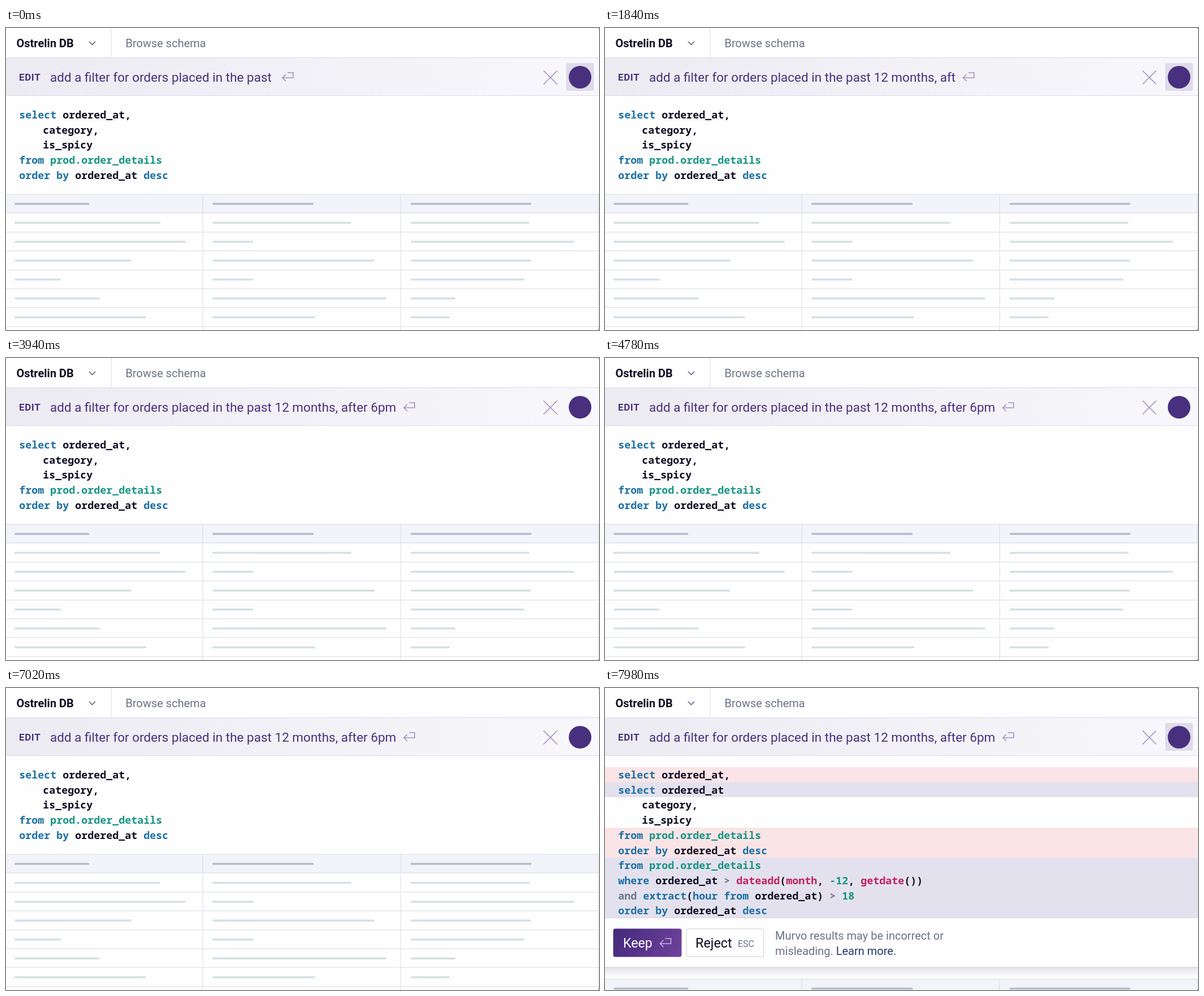
Write an HTML page with a canvas that moves like this. It is 1049 by 534 pixels and loops after 8 s.

```html
<!DOCTYPE html>
<html lang="en">
<head>
<meta charset="utf-8">
<title>Query edit</title>
<style>
html, body { margin: 0; width: 100%; height: 100%; overflow: hidden; background: #fff; }
canvas { display: block; width: 1049px; height: 534px; }
</style>
</head>
<body>
<canvas id="stage" width="1049" height="534"></canvas>
<script>
const W = 1049, H = 534, LOOP = 8000;
const ctx = document.getElementById('stage').getContext('2d');

const SANS = 'Roboto, "Open Sans", sans-serif';
const MONO = '"Noto Sans Mono", "DejaVu Sans Mono", monospace';
const INK = '#0d0b22', BLUE = '#1b6fa3', TEAL = '#149482', PINK = '#c31f5f', GRAY = '#6b7388';
const PURPLE = '#48307f', LILAC = '#a490c6', LINE = '#dcdaee';
const RED_BAND = '#fae4e6', NEW_BAND = '#e4e1ee';

const TYPE_STEP = 130, LOAD_START = 2800, LOAD_END = 7150;
const SHIFT_MS = 290, PANEL_START = 7540, PANEL_MS = 250;
const PROMPT = 'add a filter for orders placed in the past ';
const TYPED = '12 months, after 6pm';

// Code lines: [indent, band colour, ...[colour, text]]
const selectLine = (band, end) => [0, band, [BLUE, 'select '], [INK, 'ordered_at' + end]];
const fromLine = band => [0, band, [BLUE, 'from '], [TEAL, 'prod.order_details']];
const orderLine = band => [0, band, [BLUE, 'order by '], [INK, 'ordered_at '], [BLUE, 'desc']];
const columns = [[42, null, [INK, 'category,']], [42, null, [INK, 'is_spicy']]];

const BEFORE = [selectLine(null, ','), ...columns, fromLine(null), orderLine(null)];
const AFTER = [
  selectLine(RED_BAND, ','), selectLine(NEW_BAND, ''), ...columns,
  fromLine(RED_BAND), orderLine(RED_BAND), fromLine(NEW_BAND),
  [0, NEW_BAND, [BLUE, 'where '], [INK, 'ordered_at '], [GRAY, '> '], [PINK, 'dateadd'], [INK, '('],
    [PINK, 'month'], [INK, ', '], [TEAL, '-12'], [INK, ', '], [PINK, 'getdate'], [INK, '())']],
  [0, NEW_BAND, [GRAY, 'and '], [BLUE, 'extract'], [INK, '('], [BLUE, 'hour from '],
    [INK, 'ordered_at) '], [GRAY, '> '], [TEAL, '18']],
  orderLine(NEW_BAND)
];

// Right ends of the placeholder bars, per column
const COLS = [
  { x: 15, head: 147.5, ends: [273, 318, 222, 97, 166, 248] },
  { x: 365, head: 544.5, ends: [611, 438, 652, 438, 673, 547] },
  { x: 715.5, head: 929.5, ends: [926, 1005, 929, 917, 795, 785] }
];

const clamp = v => Math.max(0, Math.min(1, v));
const ease = v => v * v * (3 - 2 * v);

function rect(x, y, w, h, fill) {
  ctx.fillStyle = fill;
  ctx.fillRect(x, y, w, h);
}

function box(x, y, w, h, r, fill) {
  ctx.beginPath();
  ctx.roundRect(x, y, w, h, r);
  ctx.fillStyle = fill;
  ctx.fill();
}

function text(str, x, y, size, color, weight = 400, family = SANS) {
  ctx.font = `${weight} ${size}px ${family}`;
  ctx.fillStyle = color;
  ctx.fillText(str, x, y);
  return ctx.measureText(str).width;
}

function stroke(color, width, ...paths) {
  ctx.strokeStyle = color;
  ctx.lineWidth = width;
  ctx.beginPath();
  for (const [start, ...rest] of paths) {
    ctx.moveTo(...start);
    rest.forEach(p => ctx.lineTo(...p));
  }
  ctx.stroke();
}

function gradient(x0, y0, x1, y1, from, to) {
  const g = ctx.createLinearGradient(x0, y0, x1, y1);
  g.addColorStop(0, from);
  g.addColorStop(1, to);
  return g;
}

function enterIcon(x, y, color) {
  stroke(color, 1.6,
    [[x + 10, y - 8], [x + 20, y - 8], [x + 20, y + 1], [x + 1, y + 1]],
    [[x + 7, y - 5], [x + 1, y + 1], [x + 7, y + 7]]);
}

function header() {
  rect(0, 0, W, 52, '#fefefe');
  text('Ostrelin DB', 18.5, 33.5, 20, INK, 600);
  stroke('#5d6480', 1.6, [[147, 24], [152.5, 29.5], [158, 24]]);
  rect(185.5, 0, 1, 52, LINE);
  text('Browse schema', 211.5, 33.5, 20, GRAY);
}

function editBar(t) {
  rect(0, 52, W, 68, gradient(0, 0, W, 0, '#ecebf2', '#f8f7fb'));
  rect(0, 52, W, 1, LINE);
  rect(0, 119, W, 1, LINE);
  ctx.letterSpacing = '0.6px';
  text('EDIT', 23, 93, 17, PURPLE, 700);
  ctx.letterSpacing = '0px';

  const count = Math.min(TYPED.length, Math.floor(t / TYPE_STEP));
  const width = text(PROMPT + TYPED.slice(0, count), 78, 94.5, 22.5, PURPLE);
  enterIcon(78 + width + 12.5, 87, LILAC);

  stroke(LILAC, 1.7, [[951, 75.5], [975, 99.5]], [[975, 75.5], [951, 99.5]]);
  const loading = t >= LOAD_START && t < LOAD_END;
  if (!loading) box(991, 62, 49, 49, 3, '#dfdbea');
  ctx.beginPath();
  ctx.arc(1015.5, 87, 20, 0, Math.PI * 2);
  ctx.fillStyle = PURPLE;
  ctx.fill();
}

function code(lines) {
  lines.forEach(([indent, band, ...runs], i) => {
    const top = 140 + i * 26.7;
    if (band) rect(0, Math.round(top), W, Math.round(top + 26.7) - Math.round(top), band);
    let x = 23.3 + indent;
    for (const [color, str] of runs) x += text(str, x, top + 20, 18.34, color, 600, MONO);
  });
}

function table(top) {
  rect(0, top, W, H, '#fefefe');
  rect(0, top, W, 33.5, '#f3f4f9');
  for (let i = 0; i < 8; i++) rect(0, Math.round(top + i * 33.4) - 0.5, W, 1, LINE);
  for (const x of [347.5, 697.5, 1047.5]) rect(x, top, 1, H, LINE);
  for (const { x, head, ends } of COLS) {
    box(x, top + 15.3, head - x, 3.5, 1.75, '#b6bbd0');
    ends.forEach((end, i) => box(x, top + 48.8 + i * 33.4, end - x, 3.5, 1.75, '#d6e0e4'));
  }
}

function panel(alpha) {
  ctx.save();
  ctx.globalAlpha = alpha;
  rect(0, 494, W, 20, gradient(0, 494, 0, 512, '#e6e5ea', '#fefefe'));
  rect(0, 406, W, 88, '#fefefe');
  rect(0, 406, W, 1, '#d9d7e3');
  rect(0, 493.5, W, 1, '#cfcdd6');

  box(14.5, 425.5, 121, 50, 4, gradient(15, 426, 135, 475, '#432a7d', '#70419a'));
  text('Keep', 32, 459, 23.2, '#fff');
  enterIcon(96.5, 451, '#c9b5dd');

  box(143.5, 425.5, 137.5, 50, 4, '#cfced8');
  box(144.5, 426.5, 135.5, 48, 3, '#fefefe');
  text('Reject', 160, 459, 23.4, INK);
  text('ESC', 235, 458, 16, GRAY);

  text('Murvo results may be incorrect or', 301, 445, 20, GRAY);
  const width = text('misleading. ', 301, 472, 20, GRAY);
  text('Learn more.', 301 + width, 472, 20, '#213a70');
  ctx.restore();
}

function draw(t) {
  rect(0, 0, W, H, '#141420');
  ctx.save();
  ctx.beginPath();
  ctx.roundRect(0, 0, W, H, [0, 3, 3, 0]);
  ctx.clip();
  rect(0, 0, W, H, '#fefefe');
  code(t < LOAD_END ? BEFORE : AFTER);
  table(294 + 220.5 * ease(clamp((t - LOAD_END) / SHIFT_MS)));
  if (t >= PANEL_START) panel(ease(clamp((t - PANEL_START) / PANEL_MS)));
  header();
  editBar(t);
  ctx.restore();
}

const begin = performance.now();
function tick() {
  draw((performance.now() - begin) % LOOP);
  requestAnimationFrame(tick);
}
tick();
</script>
</body>
</html>
```
